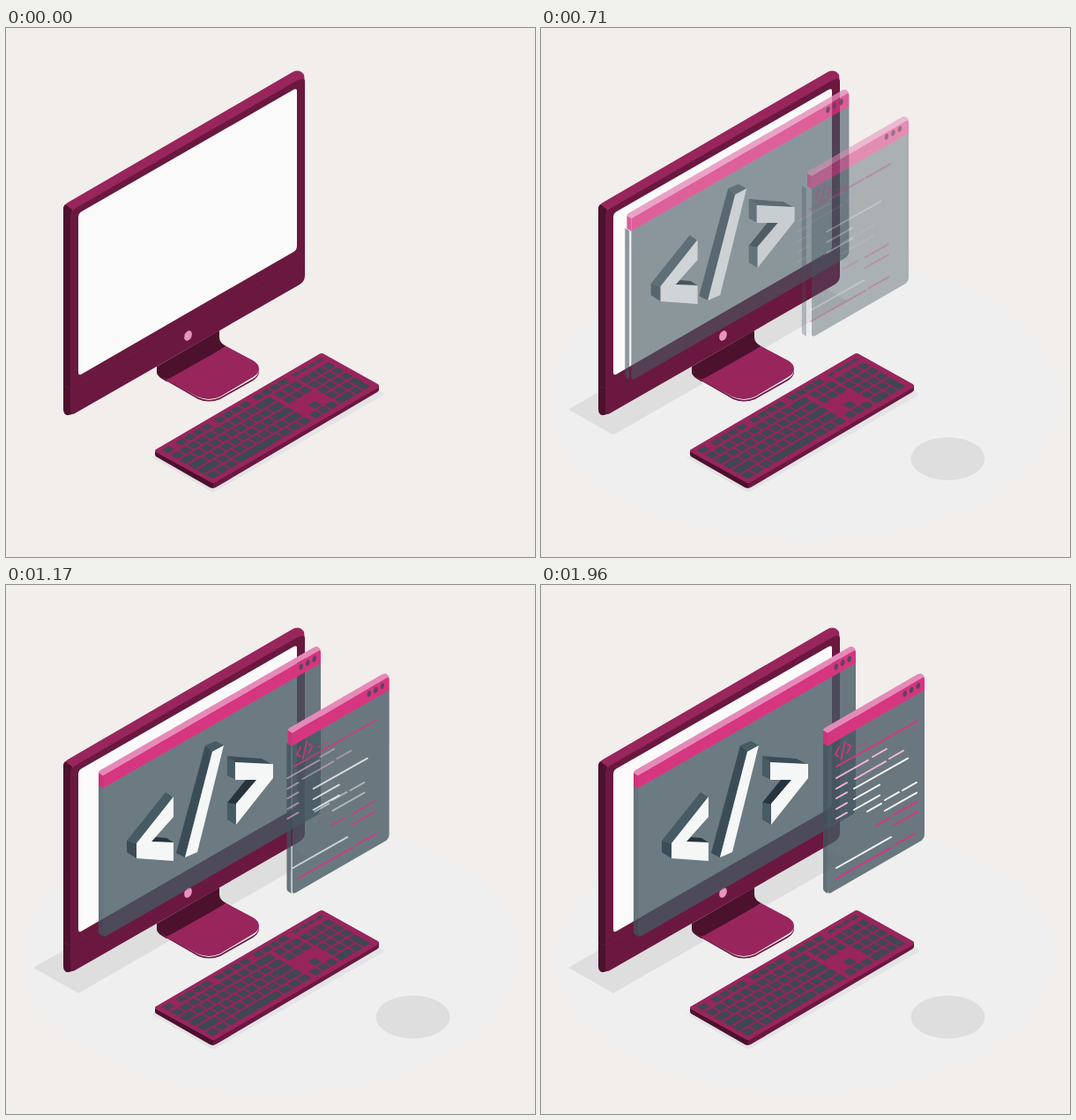
An HTML page that plays this animation: 600 px wide and 600 px high, repeating every 2000 ms.

```html
<!DOCTYPE html>
<html lang="en">
<head>
<meta charset="utf-8">
<title>Isometric code windows</title>
<style>
html, body { margin: 0; width: 100%; height: 100%; overflow: hidden; background: #f2eeeb; }
svg { display: block; width: 100vw; height: 100vh; }
</style>
</head>
<body>
<svg id="stage" viewBox="0 0 600 600"></svg>
<script>
const LOOP = 2000, FPS = 24, TRAVEL = 70, SLOPE = 0.574;
const LIGHT = '#98255c', FRONT = '#6a183f', SIDE = '#4c112d';
const PINK = '#d6357f', PALE = '#f0b4d6', WHITE = '#f5f6f6', KEY = '#3f4751';

const shape = (d, fill) => `<path d="${d}" fill="${fill}"/>`;
const poly = (points, fill) => `<polygon points="${points}" fill="${fill}"/>`;
// A part slides in from the left and fades in
const part = (start, time, content) =>
  `<g class="part" data-start="${start}" data-time="${time}" opacity="0">${content}</g>`;

function monitor() {
  return shape('M171 384L242 343V351Q242 357 250 361L188 399 182 401Q171 395 171 391Z', SIDE) +
    shape('M176 395L218 419Q230 425 243 419L280 398Q287 394 287 387V391Q286 396 280 400L243 421Q230 426 218 421L178 398Z', FRONT) +
    shape('M186 397L250 361 280 377Q287 381 287 387 287 392 280 396L243 418Q230 424 217 418L181 399Z', LIGHT) +
    shape('M65 207Q65 201 70 198L325 50Q333 46 338 53L339 63 73 217Z', LIGHT) +
    shape('M65 206Q65 202 67 200L75 206 73 214 75 438Q65 442 65 432Z', SIDE) +
    shape('M73 214Q73 208 78 205L331 59Q339 55 339 61V281Q339 287 333 291L80 436Q73 441 73 434Z', FRONT) +
    '<path d="M65 406L73 409 339 260" fill="none" stroke="#75204a" stroke-width=".5"/>' +
    shape('M82 215Q82 210 86 208L326 70Q330 68 330 71V247Q330 252 326 254L85 393Q82 394 82 391Z', '#fafafa') +
    '<ellipse cx="206.5" cy="349" rx="4" ry="6" fill="#e993bd" transform="rotate(24 206.5 349)"/>';
}

function keyboard() {
  let keys = '';
  const key = (a, b, w, h) => {
    keys += `<rect x="${a}" y="${b}" width="${w}" height="${h}" rx=".8"/>`;
  };
  const rowY = r => 2.5 + r * 9.9;
  const ones = n => Array(n).fill(1);
  const rows = [
    [...ones(10), 2],
    [1.5, ...ones(9), 1.5],
    [1.8, ...ones(8), 2.2],
    [2.3, ...ones(8), 1.7],
    [1.1, 1.1, 1.1, 5.3, 1.2, 1.1, 1.1]
  ];
  rows.forEach((row, r) => {
    let a = 5;
    for (const w of row) {
      key(a, rowY(r + 1), w * 9.5 - 1.8, 7.8);
      a += w * 9.5;
    }
  });
  key(5, 3, 8, 6.5);
  for (let i = 0; i < 12; i++) key(20 + i * 9.6 + (i >> 2) * 5, 3, 7.8, 6.5);
  for (let i = 0; i < 4; i++) key(151 + i * 8.7, 4, 7, 3.5);
  for (let c = 0; c < 3; c++) {
    for (const r of [1, 2, 5]) key(122 + c * 9.2, rowY(r), 7.4, 7.8);
  }
  key(131.2, rowY(4), 7.4, 7.8);
  for (let c = 0; c < 4; c++) {
    for (let r = 1; r < 4; r++) key(151 + c * 8.7, rowY(r), 7, 7.8);
    if (c < 3) key(151 + c * 8.7, rowY(4), 7, 7.8);
  }
  key(151, rowY(5), 15.7, 7.8);
  key(168.4, rowY(5), 7, 7.8);
  key(177.1, rowY(4), 7, 17.7);
  return shape('M165 487L360 374 428 414Q429 416 427 417L237 526Q234 527 231 525Z', '#e4e3e6') +
    shape('M169 480L235 516V522Q233 522 231 521L170 486 169 484Z', SIDE) +
    shape('M235 516L423 405V411L421 413 238 521 235 522Z', FRONT) +
    shape('M170 478L355 370Q358 368 361 370L422 404Q424 406 422 408L238 515Q235 517 232 515L170 481Q168 479 170 478Z', LIGHT) +
    `<g fill="${KEY}" transform="matrix(1 -.587 1.0077 .577 169 480)">${keys}</g>`;
}

// x, y: front upper left corner; starts: side, panel, dots
function appWindow(x, y, w, h, starts) {
  const r = x + w, yr = y - w * SLOPE;
  const [side, panel, dots] = starts;
  const strip = shape(`M${x - 5} ${y + 12}L${x} ${y + 15}V${y + h}L${x - 4} ${y + h - 3}Q${x - 5} ${y + h - 4} ${x - 5} ${y + h - 6}Z`, 'rgba(64,82,92,.8)');
  const body = shape(`M${x} ${y + 15}L${r} ${yr + 15}V${yr + h - 4}Q${r} ${yr + h + 1} ${r - 5} ${yr + h + 4}L${x + 4} ${y + h - 1}Q${x} ${y + h + 1} ${x} ${y + h - 3}Z`, 'rgba(70,88,97,.79)');
  const band = shape(`M${x - 5} ${y - 2}Q${x - 5} ${y - 4} ${x - 3} ${y - 5}L${r - 8} ${yr - 2.5}Q${r - 5} ${yr - 4} ${r - 3} ${yr - 3}L${r} ${yr}L${x} ${y + 1}Z`, '#e58ab8') +
    poly(`${x - 5},${y - 2} ${x},${y + 1} ${x},${y + 15.5} ${x - 5},${y + 12.5}`, '#ce327a') +
    shape(`M${x} ${y + 1}L${r - 2} ${yr + 1}Q${r} ${yr} ${r} ${yr + 3}V${yr + 15.5}L${x} ${y + 15.5}Z`, PINK);
  let buttons = '';
  for (let i = 0; i < 3; i++) {
    const cx = r - 22.3 + i * 7.5, cy = yr + 19.5 - i * 4.4;
    buttons += `<ellipse cx="${cx}" cy="${cy}" rx="2.1" ry="3.6" fill="#55465f" transform="rotate(14 ${cx} ${cy})"/>`;
  }
  return part(side, 1050, strip) + part(panel, 1050, body + band) + part(dots, 1050, buttons);
}

function symbols() {
  const mid = '#475b65', dark = '#3a4d57', deep = '#27333d';
  return part(100, 1050,
    poly('137,290 181,235 190,241 148,293', mid) +
    poly('137,290 148,293 148,310 137,303', dark) +
    poly('165,291 170,286 182,287 190,292', deep) +
    poly('148,293 190,240 190,263 165,291 190,292 190,313 148,310', WHITE)) +
  part(125, 1050,
    poly('226,182 234,189 203,309 193,304', dark) +
    poly('226,182 238,177 247,182 234,189', mid) +
    poly('234,189 247,182 217,303 203,309', WHITE)) +
  part(150, 1050,
    poly('251,194 290,197 303,204 260,201', dark) +
    poly('251,194 261,201 261,221 251,216', mid) +
    poly('251,247 272,221 285,221 261,249', deep) +
    poly('251,247 261,249 261,272 251,266', mid) +
    poly('260,201 303,203 303,219 261,272 261,248 284,221 260,221', WHITE));
}

// Each line is [x1, y1, x2] and follows the window's slant
function lines(start, time, color, list) {
  const d = list.map(([x, y, end]) => `M${x} ${y}L${end} ${y - (end - x) * 0.565}`).join('');
  return part(start, time, `<path d="${d}" fill="none" stroke="${color}" stroke-width="2" stroke-linecap="round"/>`);
}

function codeText() {
  const dashes = [219, 231, 242, 254, 265].map((y, i) => [335, y, i ? 347 : 371]);
  const icon = `<g fill="none" stroke="${PINK}" stroke-width="1.7">` +
    '<path d="M338.5 183L334 192 338 195M345 177L340.5 198M347 180L351.5 183 347 191"/>' +
    '<path d="M358 184L368 179" stroke-dasharray="2 2.5"/></g>';
  return part(115, 1381, icon) +
    lines(209, 1473, PINK, [[335, 206, 396], [399, 170, 427]]) +
    lines(398, 1454, PALE, dashes) +
    lines(460, 1500, PALE, [[376, 195, 392], [356, 220, 391], [395, 197, 411]]) +
    lines(283, 1260, WHITE, [[355, 231, 416], [355, 243, 384], [355, 255, 384]]) +
    lines(460, 1500, WHITE, [[370, 257, 386], [390, 244, 406], [410, 233, 426], [390, 256, 426]]) +
    lines(307, 1447, PINK, [[380, 273, 396]]) +
    lines(279, 1381, PINK, [[401, 260, 427], [401, 272, 427]]) +
    lines(163, 1600, WHITE, [[335, 321, 397]]) +
    lines(300, 1150, PINK, [[335, 333, 397], [401, 295, 424]]);
}

const stage = document.getElementById('stage');
stage.innerHTML =
  '<ellipse id="ground" rx="284" ry="156" fill="#efefef"/>' +
  '<g id="shadows" fill="#dedede"><path d="M31 434L82 463 347 311 296 282Z"/>' +
  '<ellipse cx="461.5" cy="490" rx="42" ry="24.3"/></g>' +
  monitor() + keyboard() +
  appWindow(110, 215, 247, 184, [50, 5, 40]) + symbols() +
  appWindow(325, 167, 110, 183, [275, 190, 230]) + codeText();

const ground = document.getElementById('ground');
const shadows = document.getElementById('shadows');
const parts = [...stage.querySelectorAll('.part')].map(el => ({
  el, start: +el.dataset.start, time: +el.dataset.time
}));

const clamp = v => Math.min(1, Math.max(0, v));
const smooth = v => { v = clamp(v); return v * v * (3 - 2 * v); };
// Distance left to rest, with one small overshoot
const spring = t => Math.exp(-0.00215 * t) * Math.cos(0.00245 * t) * (1 - smooth((t - 600) / 350));

function draw(t) {
  const left = spring(t), fade = smooth(t / 650);
  ground.setAttribute('transform', `translate(299 421) scale(${1 - left})`);
  ground.setAttribute('opacity', fade);
  shadows.setAttribute('transform', `translate(0 ${left * 56})`);
  shadows.setAttribute('opacity', fade);
  for (const { el, start, time } of parts) {
    const p = clamp((t - start) / time);
    el.setAttribute('transform', `translate(${-TRAVEL * (1 - p) ** 2} 0)`);
    el.setAttribute('opacity', smooth(p * 1.04));
  }
}

const begin = performance.now();
function tick() {
  const t = (performance.now() - begin) % LOOP;
  draw(Math.floor((t + 4) * FPS / 1000) % (LOOP * FPS / 1000) * 1000 / FPS);
  requestAnimationFrame(tick);
}
tick();
</script>
</body>
</html>
```
